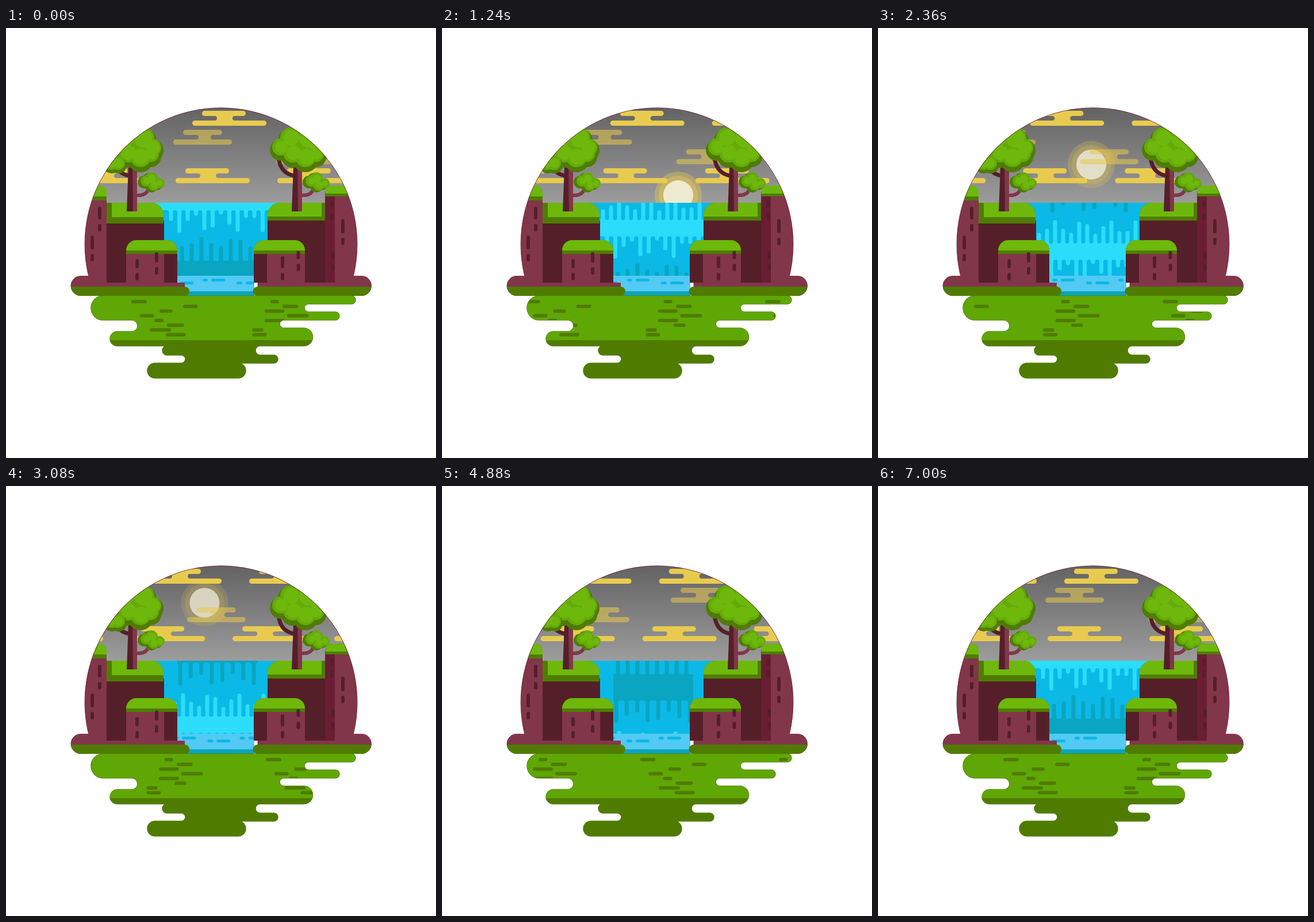
An HTML page that plays this animation: 748 by 748 pixels, repeating every 7080 ms.

```html
<!DOCTYPE html>
<html lang="en">
<head>
<meta charset="utf-8">
<title>Waterfall</title>
<style>
html, body { margin: 0; width: 100%; height: 100%; overflow: hidden; background: #fff; }
svg { display: block; width: 100vw; height: 100vh; }
</style>
</head>
<body>
<svg id="stage" viewBox="0 0 748 748" xmlns="http://www.w3.org/2000/svg"></svg>
<script>
const LEAF = '#6db80b', LEAF_MID = '#64aa09', MOSS = '#4f7c00', LAWN = '#5fa705';
const ROCK = '#82364a', DARK = '#551f29', SHADE = '#6b1d34';
const CYAN = '#2bddfa', BLUE = '#0bb9e6', TEAL = '#0aa5c0', POOL = '#52caf3';
const GOLD = '#e8cb4e';
const MOVE_MS = 7000, LOOP_MS = 7080, STEP_MS = 40;
const CLOUD_GAP = 177, PALE_GAP = 353, FALL = 255, RIPPLE_GAP = 115, GRASS_GAP = 418;

const range = n => [...Array(n).keys()];
const rect = (x, y, x2, y2, fill) =>
  `<rect x="${x}" y="${y}" width="${x2 - x}" height="${y2 - y}" fill="${fill}"/>`;
const path = (d, fill) => `<path d="${d}" fill="${fill}"/>`;
const line = (d, color, width) =>
  `<path d="${d}" fill="none" stroke="${color}" stroke-width="${width}" stroke-linecap="round"/>`;
const group = (content, x, y = 0) => `<g transform="translate(${x} ${y})">${content}</g>`;
const mirror = content => `<g transform="matrix(-1 0 0 1 748.5 0)">${content}</g>`;
const repeat = (content, gap, from, to) =>
  range(to - from + 1).map(k => group(content, (from + k) * gap)).join('');
const dash = (x, y, length, color, h) => line(`M${x + h / 2} ${y}H${x + length - h / 2}`, color, h);

// A long crack with a short one below it
const cracks = (x, y, length) =>
  line(`M${x} ${y + 3}v${length - 6}m0 14v7`, DARK, 6);

// Two bars joined by a waisted neck; x, y is the top left of its box
function cloud(x, y, topW, lowW, neckA, neckB) {
  return path(`M${x + 21.5} ${y}h${topW - 9}a4.5 4.5 0 0 1 0 9H${x + neckB + 4}a4 4 0 0 0 0 8
    H${x + lowW - 4.5}a4.5 4.5 0 0 1 0 9H${x + 4.5}a4.5 4.5 0 0 1 0-9H${x + neckA - 4}
    a4 4 0 0 0 0-8H${x + 21.5}a4.5 4.5 0 0 1 0-9z`, GOLD);
}
const bigCloud = (x, y) => cloud(x, y, 76, 129, 43, 70);
const paleCloud = (x, y) => cloud(x, y, 68, 102, 44, 65);

// Evenly spaced round fingers whose lengths follow a wave
function fringe({ x, pitch, count, tip, swing, peak, valley, left, right, fill }) {
  const s = Math.sign(tip - valley), r = 3.5;
  let d = `M${left} ${valley - s * 20}V${valley}`;
  for (const i of range(count)) {
    const a = x + i * pitch - r, end = tip + s * swing * Math.cos((i - peak) * 1.85) - s * r;
    d += `H${a - r}q${r} 0 ${r} ${s * r}V${end}a${r} ${r} 0 0 ${s > 0 ? 0 : 1} ${2 * r} 0
      V${valley + s * r}q0 ${-s * r} ${r} ${-s * r}`;
  }
  return path(`${d}H${right}V${valley - s * 20}z`, fill);
}

const wide = { left: 245, right: 485, fill: CYAN }, narrow = { left: 298, right: 437, fill: TEAL };
const torrent =
  fringe({ ...wide, x: 280, pitch: 14, count: 13, tip: 260, swing: 12, peak: 2, valley: 289 }) +
  fringe({ ...wide, x: 287, pitch: 14.5, count: 12, tip: 340, swing: 16, peak: 1, valley: 317 }) +
  rect(298, 420, 437, 435, TEAL) +
  fringe({ ...narrow, x: 306, pitch: 17, count: 8, tip: 372, swing: 8, peak: 2, valley: 405 }) +
  fringe({ ...narrow, x: 303, pitch: 18.3, count: 8, tip: 480, swing: 10, peak: 0, valley: 450 });

const ripples = dash(342, 438.5, 9, BLUE, 5) + dash(357, 438.5, 24, BLUE, 5) +
  dash(302, 443.5, 24, BLUE, 5) + dash(286, 443.5, 10, BLUE, 5);

// Two dashes in each of eight rows, at seeded places
function grassRows() {
  let seed = 11;
  const random = () => (seed = seed * 16807 % 2147483647) / 2147483647;
  return range(16).map(i => {
    const row = i >> 1, x = (i % 2 + 0.1 + 0.5 * random()) * GRASS_GAP / 2;
    return dash(197 + x, 476 + row * 8.2, 14 + 29 * random(), MOSS, 6);
  }).join('');
}

const sky = rect(130, 130, 620, 306, 'url(#dusk)') +
  `<g id="sun"><g id="halo" fill="${GOLD}"><circle r="41"/><circle r="34"/></g><circle r="26" fill="#f1ecd2"/></g>
  <g id="pale" opacity=".55">${repeat(paleCloud(291, 177) + paleCloud(470, 211), PALE_GAP, 0, 1)}</g>
  <g id="high">${repeat(bigCloud(324, 144), CLOUD_GAP, 0, 1)}</g>
  <g id="low">${repeat(bigCloud(295, 244), CLOUD_GAP, -1, 2)}</g>`;

const water = `<g clip-path="url(#fall)">${rect(245, 304, 485, 431, BLUE)}
    <g id="torrent">${torrent}${group(torrent, 0, -FALL)}</g></g>` +
  rect(298, 431, 432, 458, POOL) + rect(298, 458, 432, 466, TEAL) +
  `<g clip-path="url(#pool)"><g id="ripples">${repeat(ripples, RIPPLE_GAP, -1, 1)}</g></g>`;

const cap = (bottom, fill) => path(`M130 274H162a13 13 0 0 1 13 13V${bottom}H130z`, fill);
const cliffs = rect(130, 292, 175, 450, ROCK) + cap(300, MOSS) + cap(293, LEAF) +
  rect(572, 285, 620, 450, ROCK) + rect(555, 285, 572, 443, SHADE) +
  mirror(group(cap(293, MOSS) + cap(288, LEAF), 18)) +
  cracks(163, 311, 22) + cracks(150, 361, 24) + cracks(567, 300, 13) +
  cracks(569, 388, 14) + cracks(586, 332, 25);

const shelf = (left, bottom, fill) => path(`M${left} 304H253a21 21 0 0 1 21 21V${bottom}H${left}z`, fill);
const step = rect(209, 388, 278, 443, ROCK) + rect(275, 388, 298, 443, DARK) +
  path('M209 393v-6a18 18 0 0 1 18-18h53a18 18 0 0 1 18 18v6z', MOSS) +
  path('M209 387a18 18 0 0 1 18-18h53a18 18 0 0 1 18 18z', LEAF);
const ledges = rect(175, 335, 275, 443, DARK) + shelf(175, 340, MOSS) + shelf(184, 329, LEAF) +
  mirror(rect(193.5, 330, 293.5, 443, DARK) +
    group(shelf(174, 335, MOSS) + shelf(180, 328, LEAF), 19.5) + group(step, 19.5)) + step +
  cracks(228, 402, 16) + cracks(262, 390, 18) + cracks(481, 397, 21) + cracks(508.5, 388, 14);

// One cluster of circles drawn as shadow, leaf and highlight
function foliage(cluster, dx, dy, grow) {
  const layer = (fill, x, y, extra) => `<g fill="${fill}">` + cluster.map(([cx, cy, r]) =>
    `<circle cx="${cx + x}" cy="${cy + y}" r="${r + extra}"/>`).join('') + '</g>';
  return layer(MOSS, dx, dy, grow) + layer(LEAF_MID, 0, 0, 0) + layer(LEAF, 1, 0, -4);
}
const tree = line('M227 291Q248 292 248 275', ROCK, 6) + line('M187 225Q190 253 215 257', DARK, 7) +
  path('M213 240H223L221 319H210z', DARK) + path('M220 240H228V319H221z', ROCK) +
  foliage([[208,191,18], [238,192,20], [191,207,15], [254,208,16], [212,217,17], [234,224,18], [252,219,14]], 0, 5, 4) +
  foliage([[244,266,10], [253,262,11], [267,270,9], [257,273,10]], -4, 2, 1);
const sideBranch = foliage([[183,234,13], [195,235,12]], 1, 4, 2);

const bank = path('M130 431H152V443H311V466H130a17.5 17.5 0 0 1 0-35z', ROCK) +
  path('M113 450H311a8 8 0 0 1 0 16H130A17.5 17.5 0 0 1 113 450z', MOSS);

const lawnShape = `M169 466H601a7 7 0 0 1 0 14H526a7 7 0 0 0 0 14H573a7 7 0 0 1 0 14H483a7 7 0 0 0 0 14
  H518a15.5 15.5 0 0 1 0 31H442a8 8 0 0 0 0 16H466a7 7 0 0 1 0 14H404a13 13 0 0 1 0 26H259a13 13 0 0 1 0-26
  H305a7 7 0 0 0 0-14H280a8 8 0 0 1 0-16H193.5a12.5 12.5 0 0 1 0-25H219a10 10 0 0 0 0-20H169a21 21 0 0 1 0-42z`;
const lawn = line(lawnShape, MOSS, 1.5) +
  `<g clip-path="url(#lawn)">${rect(110, 460, 640, 544, LAWN)}${rect(110, 543, 640, 612, MOSS)}
  <g id="grass">${repeat(grassRows(), GRASS_GAP, -1, 1)}</g></g>`;

document.getElementById('stage').innerHTML = `<defs>
  <linearGradient id="dusk" gradientUnits="userSpaceOnUse" x1="0" y1="139" x2="0" y2="304">
    <stop stop-color="#646364"/><stop offset="1" stop-color="#9d9c9d"/></linearGradient>
  <clipPath id="globe"><circle cx="374" cy="375.7" r="237"/></clipPath>
  <clipPath id="fall"><path d="M250 304H480V340H455V431H275V340H250z"/></clipPath>
  <clipPath id="pool"><rect x="298" y="431" width="133" height="27"/></clipPath>
  <clipPath id="lawn"><path d="${lawnShape}"/></clipPath></defs>
  <g clip-path="url(#globe)">${sky}${cliffs}</g>${water}${ledges}
  <g clip-path="url(#globe)">${tree}${sideBranch}${group(tree, 287)}</g>
  ${line('M143.5 431A237 237 0 1 1 604.5 431', SHADE, 0.8)}${bank}${mirror(bank)}${lawn}`;

const parts = Object.fromEntries(
  ['sun', 'halo', 'pale', 'high', 'low', 'torrent', 'ripples', 'grass']
    .map(id => [id, document.getElementById(id)]));
const shift = (id, x, y = 0) => parts[id].setAttribute('transform', `translate(${x} ${y})`);

function render(ms) {
  const t = Math.min(Math.floor(ms / STEP_MS) * STEP_MS, MOVE_MS);
  const p = t / MOVE_MS, sec = t / 1000;
  shift('pale', -PALE_GAP * p);
  shift('high', -CLOUD_GAP * p);
  shift('low', -CLOUD_GAP * p);
  shift('torrent', 0, FALL * p);
  shift('ripples', -RIPPLE_GAP * p);
  shift('grass', -GRASS_GAP * p);
  shift('sun', 455.1 - 35.6 * sec, 350.1 - 47.7 * sec);
  parts.sun.setAttribute('opacity', Math.max(0, Math.min(1, 1.1 - 0.1 * sec)));
  parts.halo.setAttribute('fill-opacity', Math.max(0, 0.52 - 0.1 * sec));
}

const start = performance.now();
function tick() {
  render((performance.now() - start) % LOOP_MS);
  requestAnimationFrame(tick);
}
tick();
</script>
</body>
</html>
```
